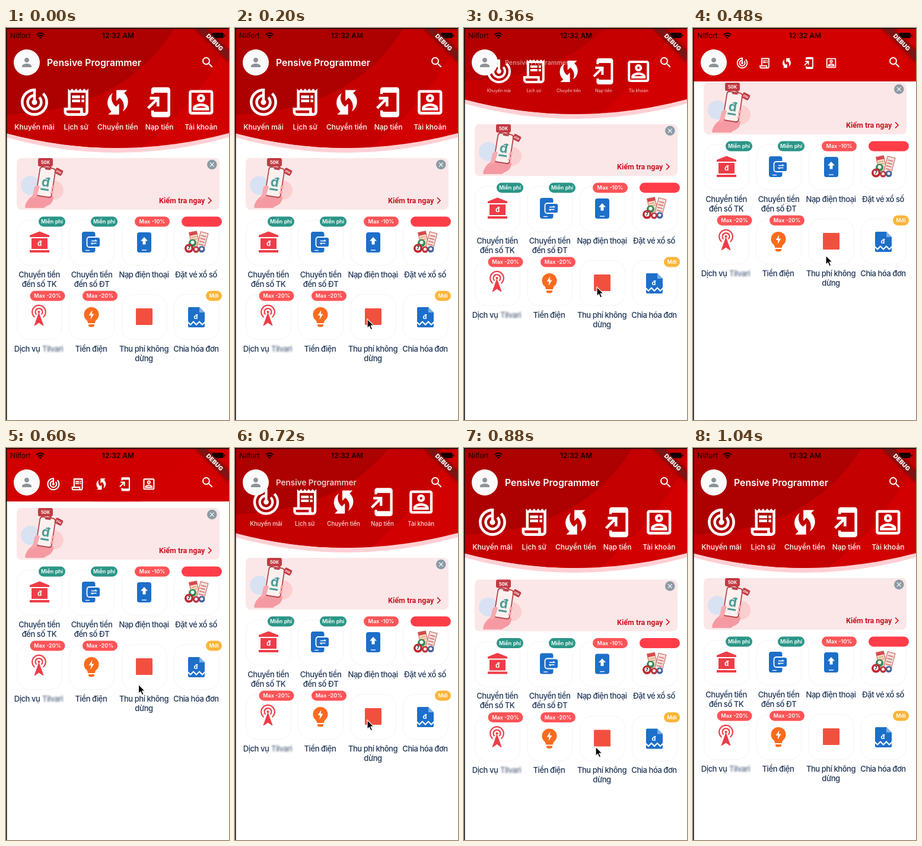
Write an HTML page that moves like this. It is 376 px wide and 660 px high and loops after 1.08 s.

```html
<!DOCTYPE html>
<html lang="vi">
<head>
<meta charset="utf-8">
<title>Wallet home</title>
<style>
html, body { margin: 0; width: 100%; height: 100%; overflow: hidden; background: #fff; }
svg { display: block; }
text { font-family: Inter, Roboto, sans-serif; }
.mid { text-anchor: middle; }
.label { font-size: 13px; font-weight: 500; letter-spacing: -.45px; fill: #1f3557; }
.badge { font-size: 9px; font-weight: 600; fill: #fff; }
.tile { fill: #fff; stroke: #f4f4f4; }
.action { font-size: 12px; font-weight: 500; fill: #fff; }
.dong { font-weight: 700; fill: #fff; text-anchor: middle; }
.blur { filter: blur(1.5px); opacity: .75; }
</style>
</head>
<body>
<svg id="stage" width="376" height="660" viewBox="0 0 376 660">
  <defs>
    <clipPath id="curve"><path d="M0-60H376V177Q188 227 0 177Z"/></clipPath>
  </defs>
  <rect width="376" height="660" fill="#fff"/>

  <g id="content">
    <rect x="18" y="219" width="342" height="87" rx="8" fill="#fbe7e8"/>
    <g id="promo">
      <circle cx="41" cy="265" r="16" fill="#d8e2f3"/>
      <circle cx="81" cy="273" r="16" fill="#fbcfd0"/>
      <path d="M32 301Q34 290 44 283L54 266Q60 262 60 270L58 280 80 284Q80 296 68 300L64 303H33Z" fill="#f59aa2"/>
      <g transform="rotate(9 67 260)">
        <rect x="53" y="234" width="28" height="51" rx="5" fill="#b5474d"/>
        <rect x="54.800" y="236" width="24.400" height="47" rx="4" fill="#fdf1ef"/>
        <rect x="62" y="235.500" width="10" height="3" rx="1.500" fill="#b5474d"/>
        <text class="dong" x="67" y="267" font-size="22" style="fill:#4a9d96">đ</text>
        <rect x="60" y="270.500" width="14" height="3" fill="#4a9d96"/>
      </g>
      <path d="M48 268Q53 262 57 267Q54 276 52 283L44 288Z M77 266q5-2 5 3l-6 3z M76 274q5-1 4 4l-6 2z" fill="#f7a9af"/>
      <path d="M57 219H76Q79 219 79 222V230Q79 233 76 233L78 237 71 233H57Q54 233 54 230V222Q54 219 57 219Z" fill="#c23b43"/>
      <text class="mid" x="66.500" y="229" font-size="7.500" font-weight="700" fill="#fff">50K</text>
      <g transform="rotate(28 89 242)">
        <rect x="82.500" y="237" width="13" height="10" rx="2" fill="#c23b43"/>
        <text class="mid" x="89" y="244" font-size="5" font-weight="700" fill="#fff">20K</text>
      </g>
    </g>
    <text x="258" y="295" font-size="12.500" font-weight="700" fill="#cb1220" style="font-family:Roboto,sans-serif">Kiểm tra ngay</text>
    <path d="M341 285.500L346 290.500 341 295.500" fill="none" stroke="#cb1220" stroke-width="1.700"/>
    <circle cx="347.300" cy="230" r="8.300" fill="#8b9ba5"/>
    <path d="M344 226.700L350.600 233.300M350.600 226.700L344 233.300" stroke="#fff" stroke-width="1.200"/>

    <g id="tiles"></g>

    <g fill="#ee3d47">
      <path d="M40 352V349L56.500 342.500 73 349V352ZM43 354H70V372H43ZM40 374H73V378H40Z"/>
      <text class="dong" x="56.500" y="367" font-size="11.500">đ</text>
    </g>
    <g fill="#1d6fc9">
      <rect x="128" y="343" width="22.500" height="35" rx="4"/>
      <rect x="136.500" y="352" width="22.500" height="17" rx="4" stroke="#fff" stroke-width="1.800"/>
      <path d="M144 358.500H152.500L150.500 356.500M152.500 362.500H144L146 364.500" fill="none" stroke="#fff" stroke-width="1.300"/>
      <path d="M134 374.500H141" stroke="#fff" stroke-width="1.300"/>
      <rect x="221" y="344" width="24" height="34" rx="4"/>
      <path d="M233 352L239 358.500H235.500V364.500H230.500V358.500H227Z" fill="#fff"/>
      <path d="M229 374H237" stroke="#fff" stroke-width="1.300"/>
    </g>
    <g id="lottery">
      <g transform="rotate(-12 317 355)">
        <rect x="311" y="343" width="13" height="27" fill="#f4dcc4" stroke="#c9544f"/>
        <path d="M311 346H324" stroke="#d9474c" stroke-width="5"/>
        <path d="M313 352H322M313 356H322" stroke="#c98b62"/>
      </g>
      <g transform="rotate(15 331 358)">
        <rect x="324.500" y="344" width="13" height="29" fill="#f3e3df" stroke="#c9544f"/>
        <path d="M326.500 350H335.500M326.500 355H335.500M326.500 360H335.500M326.500 365H335.500" stroke="#d88078" stroke-width="2"/>
      </g>
      <circle cx="314.500" cy="362" r="6.500" fill="#3a8a57"/>
      <circle cx="314.500" cy="361" r="3" fill="#fff"/>
      <circle cx="330" cy="372.500" r="5.500" fill="#41639c"/>
      <circle cx="330" cy="372" r="2.500" fill="#fff"/>
      <circle cx="320.500" cy="373" r="5.500" fill="#b9363c"/>
      <circle cx="320.500" cy="372.500" r="2.500" fill="#fff"/>
      <circle cx="308.500" cy="371" r="7.500" fill="#c0262f"/>
      <circle cx="308.500" cy="370.500" r="4" fill="#fff"/>
      <text class="mid" x="308.500" y="373" font-size="7" font-weight="700">7</text>
    </g>
    <g fill="none" stroke="#ee3d47" stroke-width="2.200">
      <path d="M48.500 487A11.300 11.300 0 1 1 62.500 487M51.500 482.500A6 6 0 1 1 59.500 482.500"/>
      <path d="M55.500 480L48 501 55.500 496 63 501Z" fill="#ee3d47" stroke-width="1"/>
      <circle cx="55.500" cy="478" r="2" fill="#ee3d47" stroke="none"/>
    </g>
    <g fill="#fb6b1d">
      <path d="M138 497Q138 493 134.500 490.500A12.500 12.500 0 1 1 153.500 490.500Q150 493 150 497Z"/>
      <path d="M139 499H149V501Q149 503 144 503.500Q139 503 139 501Z"/>
      <path d="M145.500 475L139.500 484H143.500L142.500 491 148.500 481.500H144.500Z" fill="#fff"/>
    </g>
    <rect x="219" y="472" width="28" height="28" rx="1.500" fill="#f2503f"/>
    <g fill="#1d6fc9">
      <path d="M309 470H326L335 479V494L331 498 326 493 321 498 316 493 311 498 307 494V472Q307 470 309 470Z"/>
      <path d="M307 497L311 501 316 496 321 501 326 496 331 501 335 497V502Q335 504 333 504H309Q307 504 307 502Z"/>
      <path d="M326 470V479H335Z" fill="#79aee6"/>
      <text class="dong" x="320" y="490" font-size="11">đ</text>
    </g>
  </g>

  <path id="rim" d="M0-60H376V184Q188 236 0 184Z" fill="#ffcfd3"/>
  <rect width="376" height="90" fill="#d20000"/>
  <g id="header">
    <g clip-path="url(#curve)">
      <rect y="-60" width="376" height="300" fill="#d20000"/>
      <g id="pattern">
        <path d="M0-60H376V20Q325 130 205 220H0Z" fill="#c40000"/>
        <path d="M0 146Q220 138 300-30V-60H0Z" fill="#ad0000"/>
      </g>
    </g>
  </g>
  <g id="actions"></g>
  <g id="name"><text x="0" y="5.500" font-size="15.800" font-weight="600" fill="#fff">Pensive Programmer</text></g>

  <circle cx="35" cy="58" r="22" fill="#fafafa"/>
  <path transform="translate(23 46)" fill="#8d9398" d="M12 12c2.210 0 4-1.790 4-4s-1.790-4-4-4-4 1.790-4 4 1.790 4 4 4zm0 2c-2.670 0-8 1.340-8 4v2h16v-2c0-2.660-5.330-4-8-4z"/>
  <path transform="translate(328 46)" fill="#fff" d="M15.500 14h-.79l-.28-.27A6.470 6.470 0 0 0 16 9.500 6.500 6.500 0 1 0 9.500 16c1.610 0 3.090-.59 4.230-1.570l.27.28v.79l5 4.990L20.490 19l-4.990-5zm-6 0C7.010 14 5 11.990 5 9.500S7.010 5 9.500 5 14 7.010 14 9.500 11.990 14 9.500 14z"/>

  <g fill="#170000">
    <text x="7" y="16.500" font-size="12">Nilfort</text>
    <path d="M51.500 11.500Q58 5.500 64.500 11.500M54 14.300Q58 10.500 62 14.300" fill="none" stroke="#170000" stroke-width="2"/>
    <path d="M55.800 16Q58 14 60.200 16L58 18.300Z"/>
    <text class="mid" x="189" y="16.500" font-size="12" font-weight="600">12:32 AM</text>
    <rect x="347" y="8" width="20" height="9" rx="2.500"/>
    <rect x="368" y="11" width="1.500" height="3.500"/>
  </g>
  <g transform="translate(376 0) rotate(45)">
    <rect x="-40" y="28" width="80" height="12" fill="#7f1616" fill-opacity=".9" style="filter:drop-shadow(0 0 3px #0008)"/>
    <text class="mid" x="0" y="37.700" font-size="10.200" font-weight="900" fill="#f4eeee">DEBUG</text>
  </g>
  <path d="M0 0H376V1.600H1.500V660H0Z" fill="#0c0c0c"/>
  <path id="cursor" d="M0 0V15.500L3.500 12.200 6 18 8.700 16.800 6.200 11.200H11Z" fill="#000" stroke="#fff" stroke-width="1.200"/>
</svg>

<script>
const LOOP = 1080, STEP = 40;
const $ = id => document.getElementById(id);

const GREEN = '#2b9687', RED = '#fe5457', AMBER = '#fbb53b';
// label lines, centre x, badge text, badge left, badge width, badge colour
const rows = [
  [
    [['Chuyển tiền', 'đến số TK'], 56, 'Miễn phí', 55, 45, GREEN],
    [['Chuyển tiền', 'đến số ĐT'], 144.5, 'Miễn phí', 143, 45, GREEN],
    [['Nạp điện thoại'], 232.5, 'Max -10%', 217, 59, RED],
    [['Đặt vé xổ số'], 320.5, '', 296, 68, '#ff3d49']
  ],
  [
    [['Dịch vụ'], 35.5, 'Max -20%', 40.5, 59, RED],
    [['Tiền điện'], 143.5, 'Max -20%', 129, 59, RED],
    [['Thu phí không', 'dừng'], 232.5, '', 0, 0, RED],
    [['Chia hóa đơn'], 320.5, 'Mới', 337, 27, AMBER]
  ]
];

$('tiles').innerHTML = rows.map((row, r) => row.map(([lines, cx, badge, bx, bw, color], i) => {
  const y = r * 125;
  const text = lines.map((s, n) =>
    `<text class="label mid" x="${cx}" y="${419.5 + y + n * 16}">${s}</text>`).join('');
  return `<rect class="tile" x="${18.5 + i * 88.3}" y="${323.5 + y}" width="76" height="76" rx="20"/>
    ${text}<rect x="${bx}" y="${317.5 + y}" width="${bw}" height="17" rx="8.5" fill="${color}"/>
    <text class="badge mid" x="${bx + bw / 2}" y="${329.3 + y}">${badge}</text>`;
}).join('')).join('') + '<text class="label blur" x="61" y="544.5">Tilvari</text>';

const actions = [
  ['Khuyến mãi', 'M19.07 4.93l-1.41 1.41A8.014 8.014 0 0 1 20 12c0 4.42-3.58 8-8 8s-8-3.58-8-8c0-4.08 3.05-7.44 7-7.93v2.02C8.16 6.57 6 9.03 6 12c0 3.31 2.69 6 6 6s6-2.69 6-6c0-1.66-.67-3.16-1.76-4.24l-1.41 1.41C15.55 9.9 16 10.9 16 12c0 2.21-1.79 4-4 4s-4-1.79-4-4c0-1.86 1.28-3.41 3-3.86v2.14c-.6.35-1 .98-1 1.72 0 1.1.9 2 2 2s2-.9 2-2c0-.74-.4-1.38-1-1.72V2h-1C6.48 2 2 6.48 2 12s4.48 10 10 10 10-4.48 10-10c0-2.76-1.12-5.26-2.93-7.07z'],
  ['Lịch sử', 'M19.5 3.5L18 2l-1.5 1.5L15 2l-1.5 1.5L12 2l-1.5 1.5L9 2 7.5 3.5 6 2v14H3v3c0 1.66 1.34 3 3 3h12c1.66 0 3-1.34 3-3V2zM15 20H6c-.55 0-1-.45-1-1v-1h10zm4-1c0 .55-.45 1-1 1s-1-.45-1-1v-3H8V5h11zM9 7h6v2H9zM16 7h2v2h-2zM9 10h6v2H9zM16 10h2v2h-2z'],
  ['Chuyển tiền', 'M16.71 5.29L19 3h-8v8l2.3-2.3c1.97 1.46 3.25 3.78 3.25 6.42 0 1.31-.32 2.54-.88 3.63 2.33-1.52 3.88-4.14 3.88-7.13 0-2.52-1.11-4.77-2.84-6.33zM7.46 8.88c0-1.31.32-2.54.88-3.63a8.479 8.479 0 0 0-3.88 7.13c0 2.52 1.1 4.77 2.84 6.33L5 21h8v-8l-2.3 2.3c-1.96-1.46-3.24-3.78-3.24-6.42z'],
  ['Nạp tiền', 'M18 1L8 1c-1.1 0-2 .9-2 2v3h2V5h10v14H8v-1H6v3c0 1.1.9 2 2 2h10c1.1 0 2-.9 2-2V3c0-1.1-.9-2-2-2zM10 15h2V8H5v2h3.59L3 15.59 4.41 17 10 11.41z'],
  ['Tài khoản', 'M19 5v14H5V5h14m0-2H5c-1.1 0-2 .9-2 2v14c0 1.1.9 2 2 2h14c1.1 0 2-.9 2-2V5c0-1.1-.9-2-2-2zm-7 9c-1.65 0-3-1.35-3-3s1.35-3 3-3 3 1.35 3 3-1.35 3-3 3zm0-4c-.55 0-1 .45-1 1s.45 1 1 1 1-.45 1-1-.45-1-1-1zm6 10H6v-1.53c0-2.5 3.97-3.58 6-3.58s6 1.08 6 3.58zm-9.69-2h7.38c-.69-.56-2.38-1.12-3.69-1.12s-3.01.56-3.69 1.12z']
];
$('actions').innerHTML = actions.map(([label, d]) =>
  `<path d="${d}" fill="#fff" fill-rule="evenodd"/><text class="action mid" y="4">${label}</text>`).join('');
const icons = [...$('actions').querySelectorAll('path')];
const labels = [...$('actions').querySelectorAll('text')];

// Piecewise linear value at v, held at both ends.
function track(v, keys, values) {
  if (v <= keys[0]) return values[0];
  const i = keys.findIndex(k => k > v);
  if (i < 0) return values[values.length - 1];
  const p = (v - keys[i - 1]) / (keys[i] - keys[i - 1]);
  return values[i - 1] + p * (values[i] - values[i - 1]);
}

const scrollAt = t => track(t,
  [200, 240, 280, 360, 480, 560, 600, 640, 720, 760, 800, 840, 880, 1000, 1040],
  [0, 4, 18, 57, 127, 127, 118, 94, 34, 10, -2, -4, -2.5, -.3, 0]);
const cursorY = t => track(t,
  [120, 200, 240, 360, 480, 520, 560, 720, 880, 960],
  [489, 490, 488, 436, 383, 376, 378, 458, 503, 505]);

const place = (el, x, y, scale = 1) =>
  el.setAttribute('transform', `translate(${x} ${y}) scale(${scale})`);

function draw(t) {
  const scroll = scrollAt(t), s = Math.max(0, scroll);
  const by = (...values) => track(s, [0, 34, 57, 127], values);

  place($('content'), 0, -scroll);
  place($('rim'), 0, -s);
  place($('header'), 0, -s);
  $('pattern').style.opacity = by(1, 1, .8, 0);

  const x0 = by(48, 52.5, 59, 83), gap = by(70.2, 65.3, 58.8, 37.5);
  const size = by(55, 52, 48, 22), iconY = by(125, 91, 73, 59);
  const labelY = by(167, 128, 105.5, 70), labelScale = by(1, .81, .6, .3);
  icons.forEach((icon, i) => {
    const x = x0 + i * gap;
    place(icon, x - size / 2, iconY - size / 2, size / 24);
    place(labels[i], x, labelY, labelScale);
    labels[i].style.opacity = by(1, .85, .7, 0);
  });

  place($('name'), 69, 58, by(1, .855, .677, .4));
  $('name').style.opacity = by(1, .8, .55, 0);

  place($('cursor'), track(t, [200, 360, 480, 720, 880], [223, 224, 224, 223, 222]), cursorY(t));
  $('cursor').style.display = t >= 120 && t < 1000 ? '' : 'none';
}

let start;
function tick(now) {
  start ??= now;
  draw(Math.floor((now - start) % LOOP / STEP) * STEP);
  requestAnimationFrame(tick);
}
draw(0);
requestAnimationFrame(tick);
</script>
</body>
</html>
```
